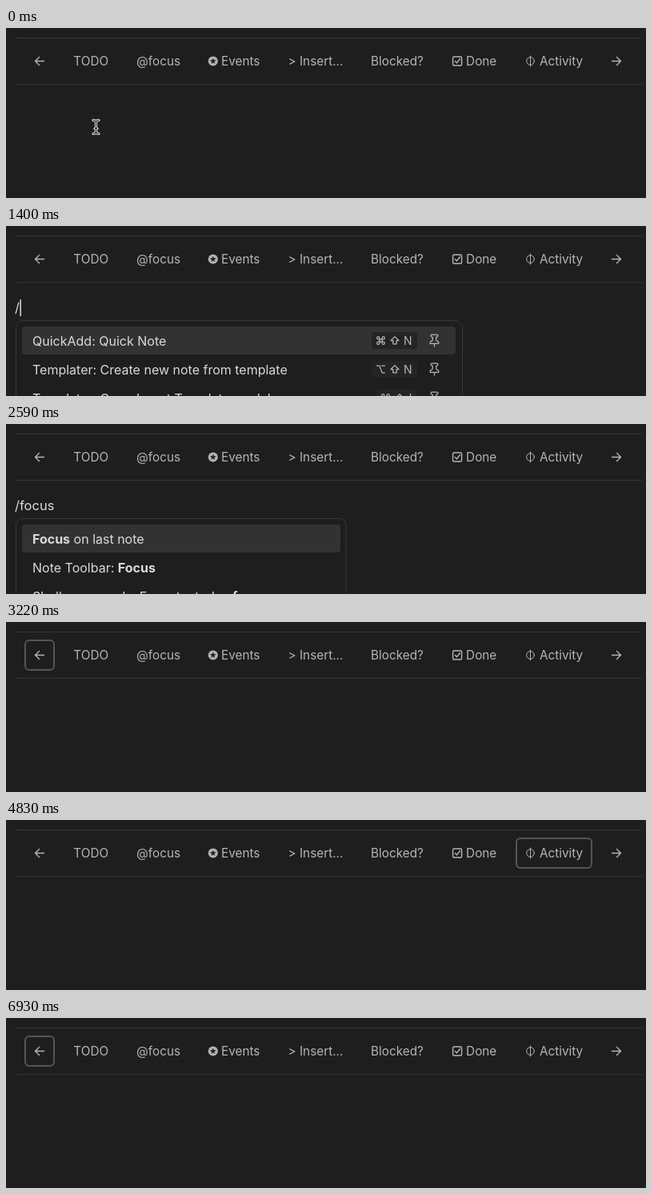
An HTML page that plays this animation: 800x213 px, repeating every 7.07 s.

```html
<!DOCTYPE html>
<html lang="en">
<head>
<meta charset="utf-8">
<title>Note toolbar</title>
<style>
  html, body { margin: 0; width: 100%; height: 100%; overflow: hidden; background: #1e1e1e; }
  svg { display: block; }
  text { font-family: Inter, "Open Sans", sans-serif; white-space: pre; }
  .bar { font-size: 15.3px; fill: #b5b5b5; text-anchor: middle; }
  .row, #typed { font-size: 16px; fill: #dadada; }
  #typed { font-size: 16.5px; }
  .key { font-size: 14px; fill: #b5b5b5; text-anchor: end; }
  .bold { font-weight: 700; }
  .icon { fill: none; stroke: #b5b5b5; stroke-linecap: round; stroke-linejoin: round; }
  .frame { fill: #1e1e1e; stroke: #373737; }
</style>
</head>
<body>
<svg width="800" height="213" viewBox="0 0 800 213">
  <defs>
    <path id="cmd" d="M15 6v12a3 3 0 1 0 3-3H6a3 3 0 1 0 3 3V6a3 3 0 1 0-3 3h12a3 3 0 1 0-3-3"/>
    <path id="opt" d="M3 4h6l6 16h6M14 4h7"/>
    <path id="shift" d="M8 20v-8H3l9-9 9 9h-5v8z"/>
    <path id="pin" d="M12 17v5M9 10.8a2 2 0 0 1-1.1 1.8l-1.8.9A2 2 0 0 0 5 15.2V17h14v-1.8a2 2 0 0 0-1.1-1.7l-1.8-.9A2 2 0 0 1 15 10.8V6h1a2 2 0 0 0 0-4H8a2 2 0 0 0 0 4h1z"/>
  </defs>

  <path d="M12 12.5H795M12 70.5H795" stroke="#373737"/>
  <g class="icon" stroke-width="1.4">
    <path d="M41.5 36.5l-5 5 5 5M36.5 41.5h11"/>
    <path d="M763.5 36.5l5 5-5 5M768.5 41.5h-11"/>
    <rect x="558.6" y="36" width="11" height="11" rx="1.5"/>
    <path d="M561.2 41.4l2.2 2.4 4-5"/>
    <g stroke-width="1"><circle cx="655.5" cy="41.5" r="4.8"/><path d="M655.5 35v13"/></g>
  </g>
  <circle cx="258.8" cy="41.5" r="6" fill="#b5b5b5"/>
  <path id="star" fill="#1e1e1e"/>
  <g id="labels"></g>
  <rect id="ring" y="23" height="37" rx="5" fill="none" stroke="#555" stroke-width="2"/>

  <text id="typed" x="11" y="108"></text>
  <rect id="caret" y="92" width="1.5" height="21" fill="#dadada"/>

  <g id="menu">
    <rect id="box" class="frame" x="12.5" y="118.5" height="120" rx="8"/>
    <rect id="pick" x="20" height="35" rx="4" fill="#323232"/>
    <g id="commands"></g>
    <g id="matches"></g>
  </g>

  <g id="pointer" fill="none" stroke-linecap="round">
    <path id="beam" stroke="#eee" stroke-width="3.2" d="M109 115.5q3.5 0 3.5 3v11q0 3-3.5 3M116 115.5q-3.5 0-3.5 3v11q0 3 3.5 3M111 126h3"/>
    <use href="#beam" id="core"/>
    <path stroke="#111" stroke-width="1.1" d="M109 115.5q3.5 0 3.5 3v11q0 3-3.5 3M116 115.5q-3.5 0-3.5 3v11q0 3 3.5 3M111 126h3"/>
  </g>
</svg>
<script>
const LOOP = 7070;
const $ = id => document.getElementById(id);
const show = (id, on) => $(id).setAttribute('visibility', on ? 'inherit' : 'hidden');
const set = (id, attrs) => {
  for (const name in attrs) $(id).setAttribute(name, attrs[name]);
};

// Toolbar: label, text centre
const labels = [['TODO', 106.2], ['@focus', 190.5], ['Events', 293.2], ['> Insert...', 387],
  ['Blocked?', 489], ['Done', 594.2], ['Activity', 694]];
$('labels').innerHTML = labels.map(([s, x]) =>
  `<text class="bar" x="${x}" y="47">${s.replace('>', '&gt;')}</text>`).join('');

$('star').setAttribute('d', 'M' + Array.from({ length: 10 }, (_, i) => {
  const r = i % 2 ? 1.7 : 4.3, a = i * Math.PI / 5;
  return `${258.8 + r * Math.sin(a)} ${41.6 - r * Math.cos(a)}`;
}).join('L') + 'z');
$('core').remove();

// Slash menu
const rowTop = i => 126 + 36 * i;
const rowText = (i, s) => `<text class="row" x="33" y="${rowTop(i) + 24}">${s}</text>`;
const icon = (id, x, y, size) => {
  const k = size / 24;
  return `<use href="#${id}" class="icon" stroke-width="${1.25 / k}" transform="translate(${x} ${y}) scale(${k})"/>`;
};
const shortcut = (i, mod, key, dx) => {
  const y = rowTop(i);
  return `<rect x="${457 + dx}" y="${y + 7}" width="${57 - dx}" height="21" rx="4" fill="#242424"/>` +
    icon(mod, 462 + dx, y + 11, 13) + icon('shift', 479.5 + dx, y + 11, 13) +
    `<text class="key" x="507.5" y="${y + 23}">${key}</text>` + icon('pin', 526.5, y + 8.5, 18);
};
$('commands').innerHTML = [
  ['QuickAdd: Quick Note', 'cmd', 'N', 0],
  ['Templater: Create new note from template', 'opt', 'N', 0],
  ['Templater: Open Insert Template modal', 'cmd', 'I', 6]
].map(([s, mod, key, dx], i) => rowText(i, s) + shortcut(i, mod, key, dx)).join('');

const matchRows = n => {
  const hit = s => `<tspan class="bold">${s.slice(0, n)}</tspan>${s.slice(n)}`;
  return [hit('Focus') + ' on last note', 'Note Toolbar: ' + hit('Focus'),
    'Shell commands: Execute: today ' + hit('focus')].map((s, i) => rowText(i, s)).join('');
};

// Timeline
const keyTimes = [1190, 1540, 1680, 1820, 1960, 2100];
const caretOn = [[350, 840], [1190, 2590], [3080, 3220]];
const ringAt = [[23, 38], [72, 69], [152, 77], [241, 89], [341, 92], [444, 90], [545, 80], [637, 96]];
const ringSteps = [3220, 3850, 4060, 4200, 4340, 4550, 4690, 4830,
  5320, 5530, 5670, 5880, 6020, 6580, 6930];
const MENU_OPEN = 1400, ARROW_DOWN = 2660, ENTER = 3220;
const passed = (times, t) => times.filter(x => t >= x).length;

let last = '';
function draw(t) {
  const typed = t < ENTER ? '/focus'.slice(0, passed(keyTimes, t)) : '';
  const caret = caretOn.some(([a, b]) => t >= a && t < b);
  const open = t >= MENU_OPEN && t < ENTER;
  const row = t >= ARROW_DOWN ? 1 : 0;
  const step = passed(ringSteps, t) - 1;
  const pointer = t < keyTimes[0];
  const state = [typed, caret, open, row, step, pointer].join();
  if (state === last) return;
  last = state;

  $('typed').textContent = typed;
  show('caret', caret);
  set('caret', { x: 11.5 + (typed ? $('typed').getComputedTextLength() : 0) });
  show('pointer', pointer);

  const filtered = typed.length > 1;
  show('menu', open);
  show('commands', !filtered);
  show('matches', filtered);
  $('commands').style.display = open && !filtered ? '' : 'none';
  $('matches').style.display = open && filtered ? '' : 'none';
  set('box', { width: filtered ? 412.5 : 558 });
  set('pick', { y: rowTop(row), width: filtered ? 398 : 542 });
  if (filtered) $('matches').innerHTML = matchRows(typed.length - 1);

  show('ring', step >= 0);
  if (step >= 0) {
    const [x, w] = ringAt[step < 8 ? step : 14 - step];
    set('ring', { x: x + 1, width: w - 2 });
  }
}

const start = performance.now();
function tick() {
  draw((performance.now() - start) % LOOP);
  requestAnimationFrame(tick);
}
tick();
</script>
</body>
</html>
```
